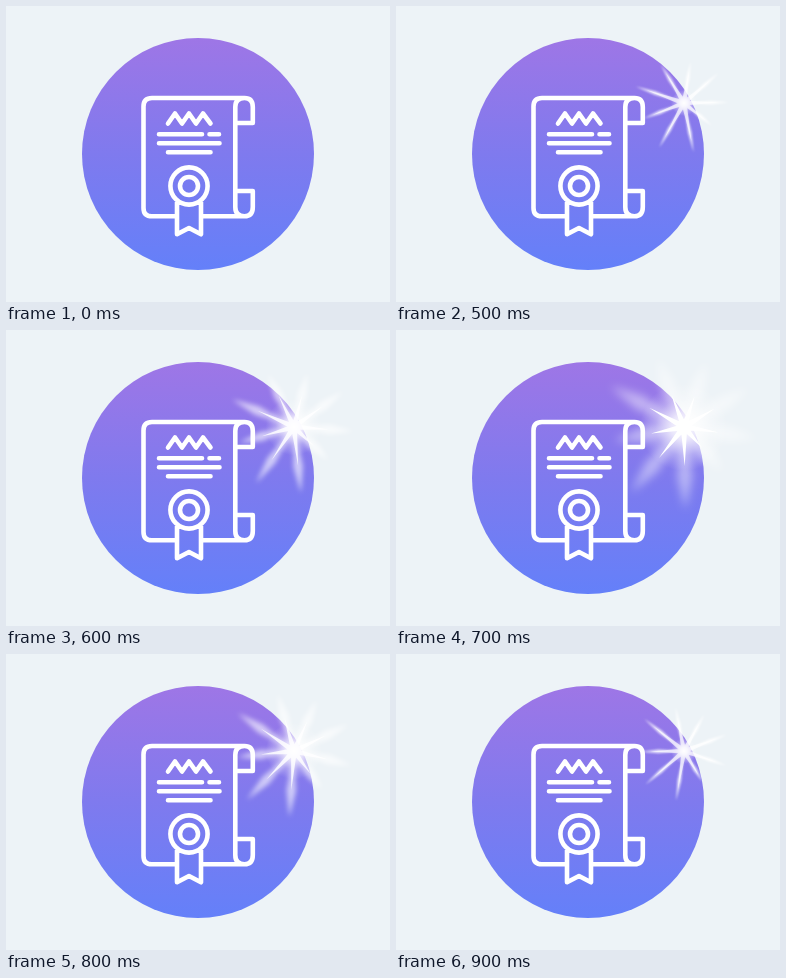
Animation of 384x296 px, one loop 1 s. Source, as an HTML page with a canvas:

```html
<!DOCTYPE html>
<html lang="en">
<head>
<meta charset="utf-8">
<title>Certificate sparkle</title>
<style>
  html, body { margin: 0; width: 100%; height: 100%; overflow: hidden; background: #edf3f7; }
  canvas { display: block; }
</style>
</head>
<body>
<canvas id="stage" width="384" height="296"></canvas>
<script>
const ctx = document.getElementById('stage').getContext('2d');
const LOOP = 1000, START = 500, STEP = 100;

const badge = ctx.createLinearGradient(0, 32, 0, 264);
badge.addColorStop(0, '#9e76e6');
badge.addColorStop(0.5, '#7f7aee');
badge.addColorStop(1, '#6480f9');

const icon = new Path2D(`
  M238.500 92H146Q137.500 92 137.500 100.500V202Q137.500 210.300 146 210.300H170M197 210.300H239
  M229.300 117V101Q229.300 92 238.500 92Q246.800 92 246.800 101V117H229.300V201Q229.300 210.300 238.500 210.300
  Q246.800 210.300 246.800 201V185H229.300
  M162 117.500L169 107.500L176 117.500L183 107.500L190 117.500L197 107.500L204.500 117.500
  M153 128.200H196M203.500 128.200H213M153 137.200H213.500M162 146.200H204.500
  M171 196V228.300L183 222L195 228.300V196
  M201.600 180A18.600 18.600 0 1 1 164.400 180A18.600 18.600 0 1 1 201.600 180
  M192 180A9 9 0 1 1 174 180A9 9 0 1 1 192 180`);

// Ray lengths, 40 degrees apart, clockwise from the right
const rays = [45, 36, 50, 51, 43, 51, 45, 42, 46];

function drawBadge() {
  ctx.fillStyle = '#edf3f7';
  ctx.fillRect(0, 0, 384, 296);
  ctx.fillStyle = badge;
  ctx.beginPath();
  ctx.arc(192, 148, 116, 0, 2 * Math.PI);
  ctx.fill();
  ctx.strokeStyle = '#fff';
  ctx.lineWidth = 4.6;
  ctx.lineCap = ctx.lineJoin = 'round';
  ctx.stroke(icon);
}

// Each ray is a kite, widest at the given fraction of its length
function drawRays(scale, width, widest, alpha, blur) {
  ctx.save();
  ctx.globalAlpha = alpha;
  ctx.filter = `blur(${blur}px)`;
  ctx.fillStyle = '#fff';
  ctx.beginPath();
  rays.forEach((ray, i) => {
    const angle = i * 2 * Math.PI / rays.length;
    const c = Math.cos(angle), s = Math.sin(angle);
    const at = (x, y) => [x * c - y * s, x * s + y * c];
    const length = ray * scale, mid = length * widest;
    ctx.moveTo(0, 0);
    ctx.lineTo(...at(mid, -width));
    ctx.lineTo(...at(length, 0));
    ctx.lineTo(...at(mid, width));
    ctx.closePath();
  });
  ctx.fill();
  ctx.restore();
}

function drawHalo(radius) {
  const halo = ctx.createRadialGradient(0, 0, 0, 0, 0, radius);
  halo.addColorStop(0, '#fff');
  halo.addColorStop(0.3, 'rgba(255,255,255,.76)');
  halo.addColorStop(0.65, 'rgba(255,255,255,.28)');
  halo.addColorStop(1, 'rgba(255,255,255,0)');
  ctx.fillStyle = halo;
  ctx.fillRect(-radius, -radius, 2 * radius, 2 * radius);
}

function drawSparkle(step) {
  const glow = 1 - Math.abs(step - 2) / 2;
  ctx.save();
  ctx.translate(288, 97);
  ctx.rotate((step * 5 - 1) * Math.PI / 180);
  drawRays(1 + 0.65 * glow, 1.9 + 5.6 * glow, 0.6, 0.8 - 0.35 * glow, 0.9 + 4 * glow);
  drawHalo(13 + 31 * glow);
  drawRays(0.78, 2.2 + 0.6 * glow, 0.15, 0.65 + 0.35 * glow, 0.3);
  ctx.restore();
}

function draw() {
  const t = performance.now() % LOOP;
  drawBadge();
  if (t >= START) drawSparkle(Math.floor((t - START) / STEP));
  requestAnimationFrame(draw);
}
draw();
</script>
</body>
</html>
```
